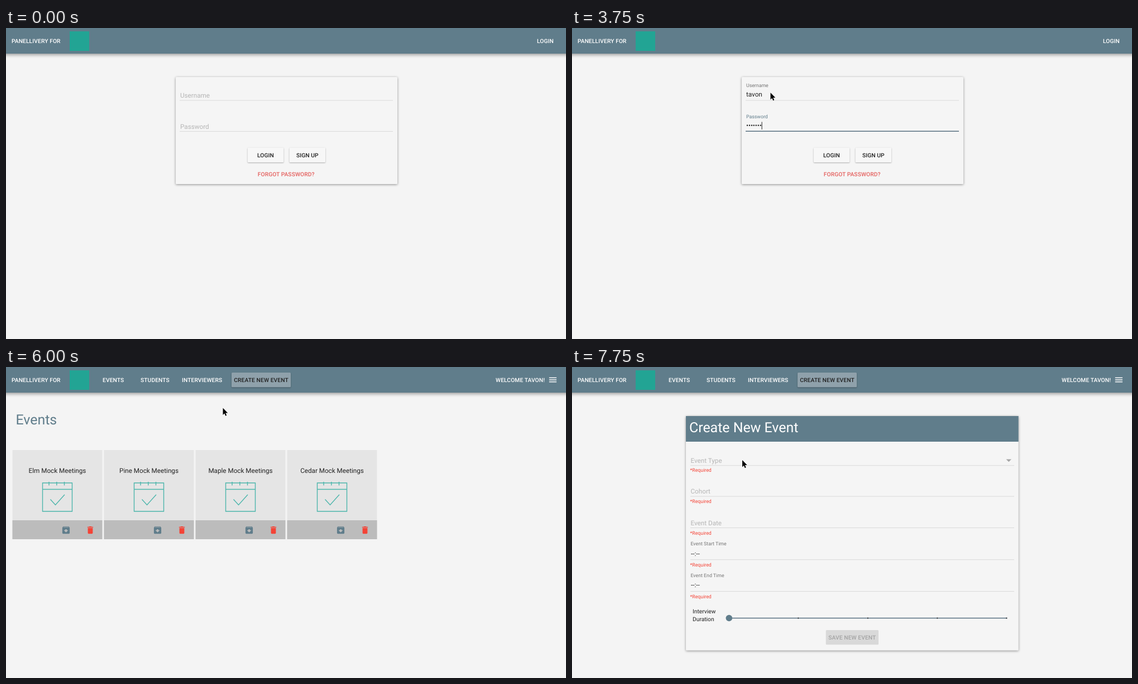
These frames come from a looping animation (1003 by 558 pixels, 8 s). An HTML page:

```html
<!DOCTYPE html>
<html lang="en">
<head>
<meta charset="utf-8">
<title>Mock interview scheduler</title>
<style>
  html, body { margin: 0; width: 100%; height: 100%; overflow: hidden; background: #f4f4f4; }
  svg { display: block; width: 1003px; height: 558px; }
  text { font-family: Roboto, sans-serif; text-rendering: geometricPrecision; white-space: pre; }
  .bar { filter: drop-shadow(0 2px 3px rgba(0,0,0,.4)); }
  .card { filter: drop-shadow(0 1px 2px rgba(0,0,0,.42)); }
  .raised { filter: drop-shadow(0 1px 1.3px rgba(0,0,0,.3)); }
</style>
</head>
<body>
<svg id="stage" viewBox="0 0 1003 558"></svg>
<script>
const LOOP = 8000, STEP = 250;
const SLATE = '#607d8b', INK = '#212121', HINT = '#b5b5b5', LABEL = '#757575', RED = '#f44336';
const SIZE = { small: 8.78, button: 10.25, body: 11.7, title: 24.9 };
const USER = 'tavon';

const rect = (x, y, w, h, fill, extra = '') =>
  `<rect x="${x}" y="${y}" width="${w}" height="${h}" fill="${fill}" ${extra}/>`;
const text = (x, y, str, size, fill, extra = '') =>
  `<text x="${x}" y="${y}" font-size="${size}" fill="${fill}" ${extra}>${str}</text>`;
const caps = (x, y, str, fill, anchor = 'start') =>
  text(x, y, str, SIZE.button, fill, `font-weight="500" letter-spacing=".1" text-anchor="${anchor}"`);
const path = (d, extra) => `<path d="${d}" ${extra}/>`;
const group = (id, content) => `<g id="${id}">${content}</g>`;
const rule = (x, y, w) => rect(x, y - .4, w, .9, '#d6d6d6');

function header() {
  return rect(-20, -20, 1043, 66, SLATE, 'class="bar"')
    + caps(10, 26.7, 'PANELLIVERY FOR', '#fff')
    + rect(114, 6, 35, 35, '#22a494');
}

function field(id, label, lineY) {
  return rule(311, lineY, 382)
    + rect(311, lineY - 1, 382, 1.5, '#566f7f', `id="${id}Focus"`)
    + text(312, lineY - 5, label, SIZE.body, HINT, `id="${id}Label"`)
    + text(312, lineY - 6.8, '', SIZE.body, INK, `id="${id}Value"`)
    + rect(312, lineY - 17, 1, 13.5, '#222', `id="${id}Caret"`);
}

function login() {
  const button = (x, label) => rect(x, 214.5, 64.4, 26.4, '#f7f7f7', 'rx="1.5" class="raised"')
    + caps(x + 32.2, 231.6, label, INK, 'middle');
  return caps(981, 26.7, 'LOGIN', '#fff', 'end')
    + rect(304, 88, 397, 192, '#f5f5f5', 'rx="1.5" class="card"')
    + field('user', 'Username', 129.9) + field('pass', 'Password', 185.5)
    + button(432.8, 'LOGIN') + button(507.6, 'SIGN UP')
    + caps(501.7, 266.3, 'FORGOT PASSWORD?', '#e4605e', 'middle');
}

function menu() {
  const bars = [18.6, 22.3, 25.9].map(y => rect(972.8, y, 13.2, 1.5, '#fff')).join('');
  return caps(173, 26.7, 'EVENTS', '#fff') + caps(241, 26.7, 'STUDENTS', '#fff')
    + caps(315, 26.7, 'INTERVIEWERS', '#fff')
    + rect(404, 10, 106, 26.3, '#8fa1ab', 'rx="1.5" id="newButton" class="raised"')
    + '<clipPath id="buttonClip"><rect x="404" y="10" width="106" height="26.3" rx="1.5"/></clipPath>'
    + '<circle id="ripple" cx="421" cy="31" r="29" opacity=".09" clip-path="url(#buttonClip)"/>'
    + caps(457, 26.7, 'CREATE NEW EVENT', INK, 'middle')
    + caps(965, 26.7, `WELCOME ${USER.toUpperCase()}!`, '#fff', 'end') + bars;
}

const ARCHIVE = 'M20.5 5.2l-1.4-1.7C18.9 3.2 18.5 3 18 3H6c-.5 0-.9.2-1.2.5L3.5 5.2C3.2 5.6 3 6 3 6.5V19'
  + 'c0 1.1.9 2 2 2h14c1.1 0 2-.9 2-2V6.5c0-.5-.2-.9-.5-1.3zM12 17.5L6.5 12H10v-2h4v2h3.5zM5.1 5l.8-1h12l1 1z';
const TRASH = 'M6 19c0 1.1.9 2 2 2h8c1.1 0 2-.9 2-2V7H6zM19 4h-3.5l-1-1h-5l-1 1H5v2h14z';

function tile(name, i) {
  const icon = (d, x, fill) => path(d, `fill="${fill}" transform="translate(${x} 134.9) scale(.732)"`);
  return `<g transform="translate(${11.5 + 164 * i} 149)">`
    + rect(0, 0, 161, 160, '#e5e5e5') + rect(0, 126, 161, 34, '#bcbcbc')
    + text(80.5, 41.3, name, SIZE.body, INK, 'text-anchor="middle"')
    + path('M54 59h53v51H54zM54 70.5h53M65.5 57v6.5M79.3 57v6.5M93 57v6.5M68 88.5l9 10L93.5 80',
      'fill="none" stroke="#4db6ac" stroke-width="1.4"')
    + icon(ARCHIVE, 87.2, SLATE) + icon(TRASH, 130.7, RED) + '</g>';
}

function events() {
  return text(17.5, 103.3, 'Events', SIZE.title, SLATE)
    + ['Elm', 'Pine', 'Maple', 'Cedar'].map((tree, i) => tile(tree + ' Mock Meetings', i)).join('');
}

function form() {
  const row = (label, lineY, noteY) => text(212.5, lineY - 5, label, SIZE.body, HINT) + foot(lineY, noteY);
  const foot = (lineY, noteY) => rule(212, lineY, 580) + text(211.5, noteY, '*Required', SIZE.small, RED);
  const time = (label, lineY) => text(212.5, lineY - 25.3, label, SIZE.small, LABEL)
    + text(213, lineY - 7.2, '--:--', SIZE.body, INK) + foot(lineY, lineY + 12.1);
  const ticks = [405.5, 530, 654.5, 778.5].map(x => rect(x - 1, 449.7, 1.6, 1.7, '#111')).join('');
  return rect(204, 88, 595.7, 420.5, '#f5f5f5', 'rx="1.5" class="card"')
    + rect(204, 88, 595.7, 46, SLATE) + text(210, 116.9, 'Create New Event', SIZE.title, '#fff')
    + row('Event Type', 176.7, 188.3) + path('M777.5 165.5h9.5l-4.75 4.8z', 'fill="#a6a6a6"')
    + row('Cohort', 232, 243.8) + row('Event Date', 288.5, 300.6)
    + time('Event Start Time', 345.7) + time('Event End Time', 402.6)
    + text(216, 441.6, 'Interview', SIZE.button, INK) + text(216, 456, 'Duration', SIZE.button, INK)
    + rect(281, 449.8, 498.5, 1.5, '#566f80') + ticks
    + `<circle cx="281.3" cy="450.5" r="5.8" fill="${SLATE}"/>`
    + rect(454.7, 472, 94.3, 26.3, '#d9d9d9', 'rx="1.5"')
    + caps(501.8, 489, 'SAVE NEW EVENT', '#a3a3a3', 'middle');
}

const stage = document.getElementById('stage');
stage.innerHTML = rect(0, 0, 1003, 558, '#f4f4f4')
  + header() + group('login', login()) + group('menu', menu())
  + group('events', events()) + group('form', form())
  + path('M0 0v12.4l2.8-2.6 1.9 4.4 2-.9-1.9-4.2h3.9z',
    'id="cursor" stroke="#fff" stroke-width=".8" paint-order="stroke"');

const el = id => document.getElementById(id);
const show = (id, on) => el(id).setAttribute('display', on ? 'inline' : 'none');
const clamp = v => Math.min(1, Math.max(0, v));
const mix = (a, b, p) => a + (b - a) * p;
const smooth = p => p * p * (3 - 2 * p);

const moves = [
  { start: 250, end: 1000, from: [2, 62], to: [355.5, 116] },
  { start: 5500, end: 6500, from: [355.5, 116], to: [421.5, 31] },
  { start: 7250, end: 7750, from: [421.5, 31], to: [305, 167] },
];

function drawField(id, lineY, floated, focused, value, caretOn) {
  const label = el(id + 'Label'), content = el(id + 'Value');
  label.setAttribute('y', mix(lineY - 5, lineY - 23.8, floated));
  label.setAttribute('font-size', mix(SIZE.body, SIZE.small, floated));
  label.setAttribute('fill', focused ? SLATE : floated ? LABEL : HINT);
  content.textContent = value;
  el(id + 'Caret').setAttribute('x', 312 + (value ? content.getComputedTextLength() : 0));
  show(id + 'Focus', focused);
  show(id + 'Caret', focused && caretOn);
}

function draw(t) {
  show('login', t < 5000);
  show('menu', t >= 5000);
  show('events', t >= 5000 && t < 7250);
  show('form', t >= 7250);

  const onPassword = t >= 2750;
  const letters = t < 2250 ? 0 : t < 2500 ? 2 : USER.length;
  const dots = t < 3250 ? 0 : Math.min(12, 1 + 3 * (t - 3250) / STEP);
  drawField('user', 129.9, clamp((t - 1133) / 260), t >= 1250 && !onPassword,
    USER.slice(0, letters), t < 1750 || t >= 2250);
  drawField('pass', 185.5, clamp((t - 2510) / 260), onPassword, '•'.repeat(dots), t < 4750);

  const pressed = t >= 7000 && t < 7250;
  show('ripple', pressed);
  el('newButton').style.filter = pressed ? 'drop-shadow(0 2px 3px rgba(0,0,0,.4))' : '';

  const move = moves.filter(m => t >= m.start).pop();
  show('cursor', !!move);
  if (move) {
    const p = smooth(clamp((t - move.start) / (move.end - move.start)));
    const [x, y] = move.from.map((v, i) => mix(v, move.to[i], p));
    el('cursor').setAttribute('transform', `translate(${x} ${y})`);
  }
}

const began = performance.now();
function tick() {
  const t = (performance.now() - began) % LOOP;
  draw(Math.floor(t / STEP) * STEP);
  requestAnimationFrame(tick);
}
tick();
</script>
</body>
</html>
```
